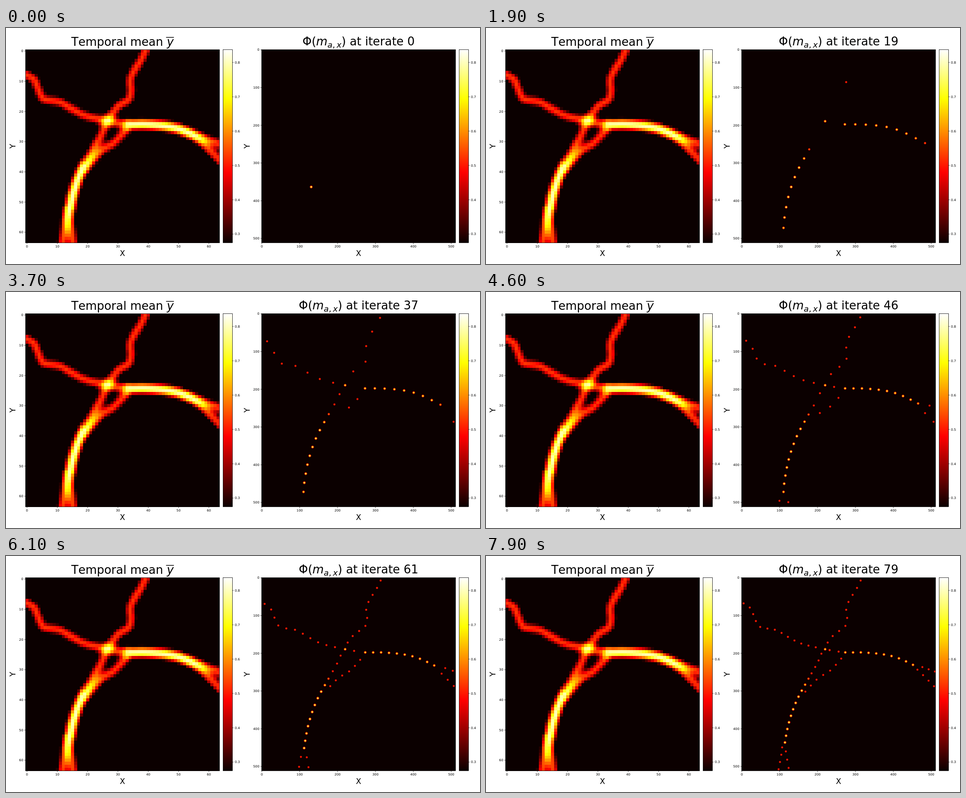
An HTML page with a canvas that plays this animation: 1058 by 529 pixels, repeating every 8 s.

```html
<!DOCTYPE html>
<html lang="en">
<head>
<meta charset="utf-8">
<title>Spike reconstruction</title>
<style>
html, body { margin: 0; width: 100%; height: 100%; overflow: hidden; background: #fff; }
canvas { display: block; width: 1058px; height: 529px; }
</style>
</head>
<body>
<canvas id="stage" width="1058" height="529"></canvas>
<script>
const ctx = document.getElementById('stage').getContext('2d');
const LEFT = 43.5, RIGHT = 570.5, TOP = 48.5, SIZE = 433;
const VMIN = 0.2746, VMAX = 0.8373;
const SANS = '"DejaVu Sans", sans-serif';

const clamp = v => Math.max(0, Math.min(1, v));
const mix = (a, b, u) => a + (b - a) * u;
const ramp = (a, b, v) => { const u = clamp((v - a) / (b - a)); return u * u * (3 - 2 * u); };

function hot(v) {
  const t = clamp((v - VMIN) / (VMAX - VMIN));
  return [mix(0.0416, 1, clamp(t / 0.365)), clamp((t - 0.365) / 0.381), clamp((t - 0.746) / 0.254)]
    .map(c => Math.round(c * 255));
}
const css = v => `rgb(${hot(v)})`;

// A smooth curve through nodes, sampled densely; axis 0 or 1 is the one it runs along.
function curve(axis, nodes) {
  const pts = [], lens = [0], N = 30, last = nodes.length - 1;
  for (let i = 0; i < last; i++) {
    const [a, b, c, d] = [i - 1, i, i + 1, i + 2].map(n => nodes[Math.max(0, Math.min(last, n))]);
    for (let s = 0; s < N; s++) {
      const t = s / N;
      pts.push([0, 1].map(e => b[e] + 0.5 * t * (c[e] - a[e] +
        t * (2 * a[e] - 5 * b[e] + 4 * c[e] - d[e] + t * (3 * (b[e] - c[e]) + d[e] - a[e])))));
    }
  }
  pts.push(nodes[last]);
  for (let i = 1; i < pts.length; i++)
    lens.push(lens[i - 1] + Math.hypot(pts[i][0] - pts[i - 1][0], pts[i][1] - pts[i - 1][1]));
  return { axis, pts, lens };
}

const cross = curve(0, [[571, 104], [590, 117], [603, 147], [614, 160], [647, 166], [677, 183], [706, 197],
  [757, 209], [801, 216], [835, 216], [876, 219], [908, 225], [937, 236], [980, 258]]);
const down = curve(1, [[840, 46], [829, 70], [810, 101], [804, 120], [806, 140], [800, 160], [777, 176], [755, 206],
  [739, 241], [717, 280], [693, 325], [676, 374], [667, 420], [664, 450], [664, 484]]);
const loop = curve(1, [[803, 216], [792, 231], [768, 257], [738, 277], [699, 320]]);
const footL = curve(1, [[668, 405], [661, 429], [659, 446], [652, 484]]);
const footR = curve(1, [[668, 405], [669, 435], [672, 455], [677, 484]]);
const tailUp = curve(0, [[937, 236], [974, 249], [1005, 260]]);
const tailLow = curve(0, [[937, 236], [961, 253], [1005, 297]]);

const part = ({ axis, pts }, from, to) => pts.filter(p => p[axis] >= from && p[axis] <= to);

// Blurred 64 x 64 view of three overlapping vessels.
function makeMap() {
  const vessels = [
    [...part(cross, 0, 937), ...tailLow.pts],
    [...part(down, 0, 405), ...footL.pts],
    [...tailUp.pts, ...part(cross, 801, 937), ...loop.pts, ...part(down, 308, 405), ...footR.pts]
  ];
  const map = document.createElement('canvas');
  map.width = map.height = 64;
  const m = map.getContext('2d'), cell = SIZE / 64, P = 1.65;
  for (let j = 0; j < 64; j++) for (let i = 0; i < 64; i++) {
    const x = RIGHT + (i + 0.5) * cell, y = TOP + (j + 0.5) * cell;
    let sum = 0;
    for (const pts of vessels) {
      let d = 1e9;
      for (const [a, b] of pts) d = Math.min(d, (a - x) ** 2 + (b - y) ** 2);
      sum += (0.525 * Math.exp(-d / (2 * 10.6 ** 2))) ** P;
    }
    m.fillStyle = css(sum ** (1 / P));
    m.fillRect(i, j, 1, 1);
  }
  return map;
}

// Rows of spikes: evenly spaced along a stretch that fills up from iterate `born`,
// then changes from state a to state b: [iterate, from, to, count].
const row = (line, born, a, b = a) => ({ line, born, a, b });
const rows = [
  row(down, 0, [19, 272, 448, 9], [50, 275, 448, 11]),
  row(cross, 1, [19, 801, 980, 9], [66, 802, 953, 10]),
  row(cross, 9, [19, 757, 757, 1]),
  row(down, 18, [37, 58, 178, 5], [61, 55, 194, 10]),
  row(cross, 20, [36, 583, 730, 7], [71, 575, 736, 13]),
  row(down, 24, [37, 229, 252, 2], [79, 219, 263, 4]),
  row(loop, 26, [37, 240, 259, 2], [70, 230, 304, 7]),
  row(tailLow, 36, [46, 980, 999, 2], [79, 963, 1000, 4]),
  row(footL, 42, [46, 468, 468, 1], [79, 429, 478, 4]),
  row(footR, 43, [46, 471, 471, 1], [71, 438, 475, 3]),
  row(tailUp, 44, [46, 990, 990, 1], [71, 974, 1002, 3]),
  row(cross, 44, [44, 777, 777, 1], [79, 767, 787, 2])
];

function lengthAt({ axis, pts, lens }, p) {
  const i = Math.max(1, pts.findIndex(q => q[axis] >= p));
  return mix(lens[i - 1], lens[i], (p - pts[i - 1][axis]) / (pts[i][axis] - pts[i - 1][axis]));
}

function pointAt({ pts, lens }, s) {
  const i = Math.max(1, lens.findIndex(l => l >= s));
  const u = (s - lens[i - 1]) / (lens[i] - lens[i - 1]);
  return [0, 1].map(e => mix(pts[i - 1][e], pts[i][e], u));
}

// Thin vessels give weak spikes, overlapping ones strong spikes.
function strength(line, x, y) {
  if (line === cross) return 0.56 + 0.2 * ramp(785, 800, x) * (1 - ramp(945, 995, x)) +
    0.19 * Math.exp(-(((x - 757) / 7) ** 2));
  if (line === down) return 0.56 + 0.24 * ramp(258, 305, y) * (1 - ramp(430, 490, y));
  return 0.55;
}

function rowSpikes({ line, born, a, b }, k) {
  if (k < born) return [];
  const u = b === a ? 0 : clamp((k - a[0]) / (b[0] - a[0]));
  let [, from, to, n] = a.map((v, i) => mix(v, b[i], u));
  n = Math.round(n);
  // The long lower row draws back once the feet appear.
  if (line === down && b[3] === 11) to -= 30 * ramp(46, 73, k);
  const s0 = lengthAt(line, from), s1 = lengthAt(line, to), dots = [];
  for (let i = 0; i < n; i++) {
    const slot = ((n >> 1) + i * 43) % n;
    if (k < a[0] && k < born + i * (a[0] - born) / n) break;
    const [x, y] = pointAt(line, mix(s0, s1, n > 1 ? slot / (n - 1) : 0.5));
    dots.push([x, y, strength(line, x, y)]);
  }
  return dots;
}

function drawSpike([x, y, v]) {
  const R = 5;
  for (let j = Math.floor(y) - R; j <= y + R; j++) for (let i = Math.floor(x) - R; i <= x + R; i++) {
    const d = (i + 0.5 - x) ** 2 + (j + 0.5 - y) ** 2;
    const w = v * Math.exp(-d / (2 * 2.5 ** 2));
    if (w <= VMIN) continue;
    ctx.fillStyle = css(w);
    ctx.fillRect(i, j, 1, 1);
  }
}

function text(s, x, y, size, align = 'left', style = '') {
  ctx.font = `${style} ${size}px ${SANS}`;
  ctx.textAlign = align;
  ctx.fillText(s, x, y);
}

// Runs of [string, size, style, drop], centred on cx; returns the right edge.
function runs(list, cx, y) {
  const widths = list.map(([s, size, style = '']) => {
    ctx.font = `${style} ${size}px ${SANS}`;
    return ctx.measureText(s).width;
  });
  let x = cx - widths.reduce((s, w) => s + w, 0) / 2;
  list.forEach(([s, size, style, drop = 0], i) => {
    text(s, x, y + drop, size, 'left', style);
    x += widths[i];
  });
  return x;
}

function stroke(x1, y1, x2, y2, w = 0.7) {
  ctx.lineWidth = w;
  ctx.beginPath();
  ctx.moveTo(x1, y1);
  ctx.lineTo(x2, y2);
  ctx.stroke();
}

function frame(x, w) {
  ctx.fillStyle = ctx.strokeStyle = '#000';
  ctx.lineWidth = 0.8;
  ctx.strokeRect(x, TOP, w, SIZE);
}

function axes(x0, step, count, cells, labelGap) {
  const end = TOP + SIZE, small = 7.22, unit = SIZE / cells;
  frame(x0, SIZE);
  for (let i = 0; i <= count; i++) {
    const p = (i * step + 0.5) * unit;
    stroke(x0 + p, end, x0 + p, end + 2.5);
    text(i * step, x0 + p, 492.3, small, 'center');
    stroke(x0 - 2.5, TOP + p, x0, TOP + p);
    text(i * step, x0 - 5, TOP + p + 2.5, small, 'right');
  }
  text('X', x0 + SIZE / 2, 511, 17.3, 'center');
  ctx.save();
  ctx.translate(x0 - labelGap, TOP + SIZE / 2);
  ctx.rotate(-Math.PI / 2);
  text('Y', 0, 0, 17.3, 'center');
  ctx.restore();

  const bx = x0 + 441, bw = 21;
  for (let j = 0; j < SIZE; j++) {
    ctx.fillStyle = css(mix(VMAX, VMIN, j / SIZE));
    ctx.fillRect(bx, Math.floor(TOP) + j, bw, 1);
  }
  frame(bx, bw);
  for (let v = 3; v <= 8; v++) {
    const y = TOP + SIZE * (VMAX - v / 10) / (VMAX - VMIN);
    stroke(bx + bw, y, bx + bw + 2.5, y);
    text('0.' + v, bx + bw + 5.2, y + 2.5, small);
  }
}

const map = makeMap();
const BIG = 25.95, SUB = BIG * 0.7, SLANT = 'italic';

function draw(k) {
  ctx.fontKerning = 'none';
  ctx.fillStyle = '#fff';
  ctx.fillRect(0, 0, 1058, 529);
  ctx.imageSmoothingEnabled = false;
  ctx.drawImage(map, LEFT, TOP, SIZE, SIZE);

  ctx.save();
  ctx.beginPath();
  ctx.rect(RIGHT, TOP, SIZE, SIZE);
  ctx.clip();
  ctx.fillStyle = css(0);
  ctx.fillRect(RIGHT, TOP, SIZE, SIZE);
  rows.flatMap(r => rowSpikes(r, k)).forEach(drawSpike);
  ctx.restore();

  axes(LEFT, 10, 6, 64, 22.4);
  axes(RIGHT, 100, 5, 512, 27);

  const edge = runs([['Temporal mean ', BIG], ['y', BIG, SLANT]], LEFT + SIZE / 2, 40.3);
  stroke(edge - 17, 21, edge + 0.5, 21, 1.5);
  runs([['Φ(', BIG], ['m', BIG, SLANT], ['a', SUB, SLANT, 4.6], [',\u2009', SUB, '', 4.6], ['x', SUB, SLANT, 4.6],
    [') at iterate ' + k, BIG]], RIGHT + SIZE / 2, 39);
}

let shown = -1;
function tick(now) {
  const k = Math.floor((now % 8000) / 100);
  if (k !== shown) draw(shown = k);
  requestAnimationFrame(tick);
}
draw(0);
requestAnimationFrame(tick);
</script>
</body>
</html>
```
